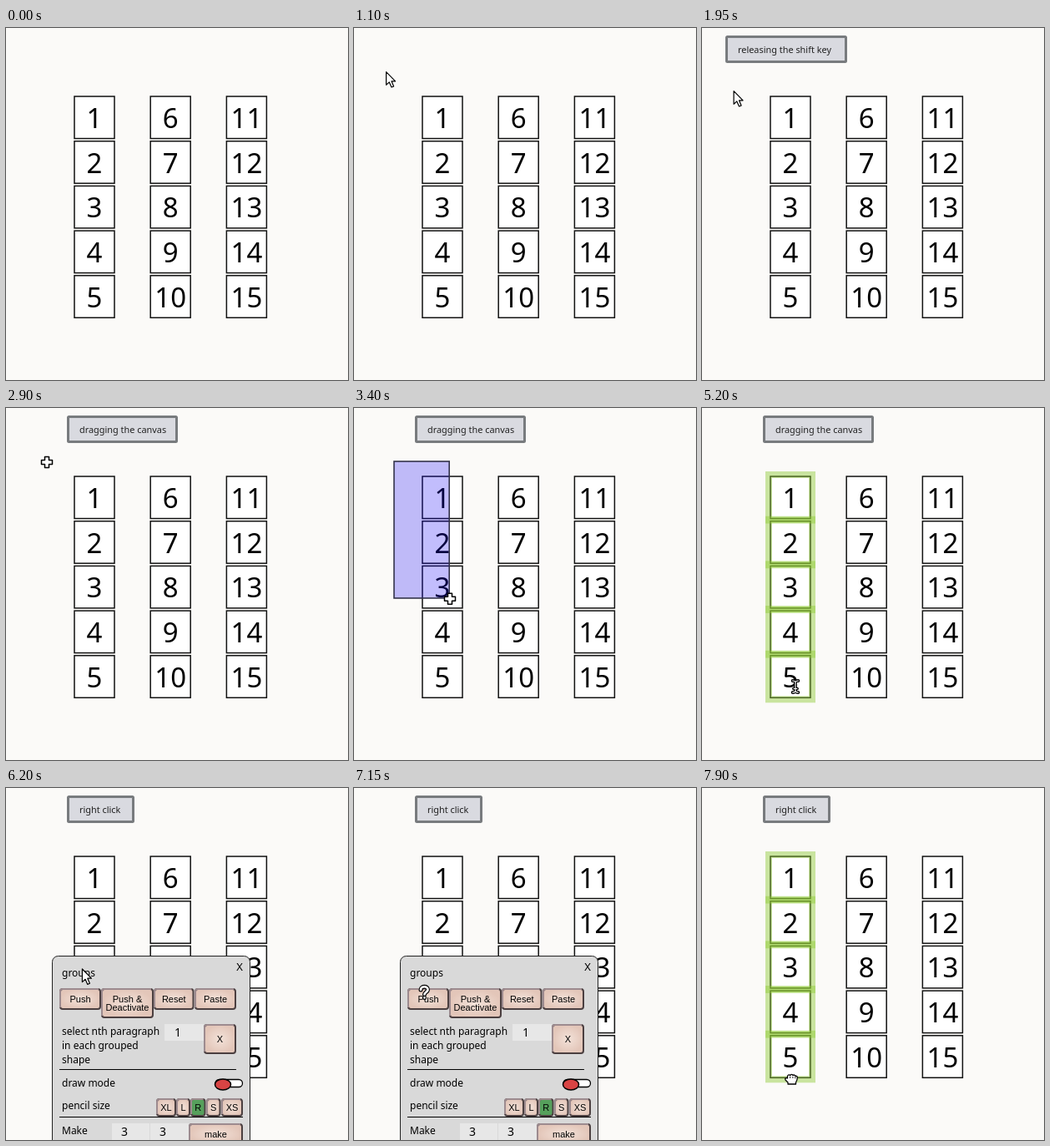
An HTML page for the animation above (8000 ms loop, 410x422 px).

```html
<!DOCTYPE html>
<html lang="en">
<head>
<meta charset="utf-8">
<title>Grouping shapes</title>
<style>
  html, body { margin: 0; width: 100%; height: 100%; overflow: hidden; background: #fbfaf8; }
  svg { display: block; width: 100%; height: 100%; font: 12px "Noto Sans", "Open Sans", sans-serif; }
  .box { fill: #fff; stroke: #111; stroke-width: 1.5; }
  .num { font-size: 33px; text-anchor: middle; }
  .glow { fill: none; stroke: #8cc832; stroke-opacity: .45; stroke-width: 8; }
  .btn { font: 11px "Liberation Sans", Arial, sans-serif; text-anchor: middle; }
  .field { fill: #e7e7e7; }
  .value { font-size: 14px; text-anchor: middle; }
  .line { stroke: #000; stroke-width: 1.2; }
  #lasso { fill: rgba(20, 0, 245, .26); stroke: #33334a; stroke-width: 1.6; }
  #label rect { fill: #d9dae0; stroke: #787b7e; stroke-width: 3; }
  #label text { font-size: 10.9px; fill: #222; }
  .cursor { fill: #fff; stroke: #000; stroke-linejoin: round; stroke-linecap: round; }
</style>
</head>
<body>
<svg id="stage" viewBox="0 0 410 422" preserveAspectRatio="xMinYMin meet">
  <defs>
    <radialGradient id="skin">
      <stop offset="0" stop-color="#f3e2d9"/>
      <stop offset="1" stop-color="#e3c6b9"/>
    </radialGradient>
  </defs>
  <g id="grid"></g>
  <g id="glow"></g>
  <rect id="lasso" x="48" y="64"/>
  <g id="label"><rect y="10.5" height="30" rx="1"/><text y="30"></text></g>
  <g id="panel"></g>
  <g id="pointer">
    <path class="cursor" data-kind="arrow" stroke-width="1.2"
      d="M.6 .6V16.2L4.3 12.9L7 19L9.6 17.9L7 11.8H11.6Z"/>
    <path class="cursor" data-kind="cross" stroke-width="1.5"
      d="M-2.5-6.5h5v4h4v5h-4v4h-5v-4h-4v-5h4z"/>
    <g class="cursor" data-kind="beam" style="fill:none">
      <path id="beam" d="M-3.5-7Q-.5-7 0-5.5Q.5-7 3.5-7M0-5.5V5.5M-3.5 7Q-.5 7 0 5.5Q.5 7 3.5 7M-2 2.5H2" stroke-width="3.4"/>
      <use href="#beam" style="stroke:#000"/>
      <path d="M-3.5-7Q-.5-7 0-5.5Q.5-7 3.5-7M0-5.5V5.5M-3.5 7Q-.5 7 0 5.5Q.5 7 3.5 7M-2 2.5H2" stroke="#fff" stroke-width="1.1"/>
    </g>
    <g class="cursor" data-kind="help" style="fill:none">
      <path d="M-4-3C-4-8 5-8 4.5-3C4.3-.5 .5 0 .5 2.5M.5 6.4V6.5" stroke-width="5"/>
      <path d="M-4-3C-4-8 5-8 4.5-3C4.3-.5 .5 0 .5 2.5M.5 6.4V6.5" stroke="#fff" stroke-width="2.7"/>
    </g>
    <g class="cursor" data-kind="hand" stroke-width="1.3">
      <path d="M-4 6V4L-7 1C-8-1-6-2-4.5-1V-3.5C-4-5.5-2-5.5-1.3-4.3C-.5-6 1.5-6 2-4.3C3-5.5 4.7-5 5-3.5C6.5-4.2 7.5-3 7.3-1.5C7.3 1 6.5 2.5 5.5 4V6Z"/>
      <path d="M-1.3-2.5V-1.5M1.9-2.5V-1.5M4.8-2.2V-1.2" stroke-width="1"/>
    </g>
  </g>
</svg>
<script>
const LOOP = 8000, TICK = 50;
const $ = id => document.getElementById(id);
const show = (el, on) => el.setAttribute('display', on ? 'inline' : 'none');

const rect = (cls, x, y, w, h, more = '') =>
  `<rect class="${cls}" x="${x}" y="${y}" width="${w}" height="${h}" ${more}/>`;
const text = (cls, x, y, s) => `<text class="${cls}" x="${x}" y="${y}">${s}</text>`;
const rule = (y, end) => `<path class="line" d="M64 ${y}H${end}"/>`;

// Bevelled button: dark frame, lighter top and left edges.
function button(x, y, w, h, lines, fill = 'url(#skin)') {
  const cx = x + w / 2, gap = 9.5;
  const base = y + h / 2 + 4 - (lines.length - 1) * gap / 2;
  return rect('', x + 1, y + 1, w - 2, h - 2, `rx="3" fill="${fill}" stroke="#4b3f40" stroke-width="2"`) +
    `<path d="M${x + 1} ${y + h - 3}V${y + 4}q0-3 3-3H${x + w - 3}" fill="none" stroke="#9d8b8f" stroke-width="2"/>` +
    lines.map((s, i) => text('btn', cx, base + i * gap, s)).join('');
}

function buildGrid() {
  let grid = '', glow = '';
  for (let i = 0; i < 15; i++) {
    const col = Math.floor(i / 5), x = 82 + col * 91.2, y = 82 + (i % 5) * 53.7;
    grid += rect('box', x, y, 48, 50.5) + text('num', x + 24, y + 38, i + 1);
    if (!col) glow += rect('glow', x - 2, y - 2, 52, 54.5);
  }
  $('grid').innerHTML = grid;
  $('glow').innerHTML = glow;
}

function buildPanel() {
  $('panel').innerHTML =
    rect('', 55.5, 201.5, 237, 240, 'rx="7" fill="#d9d9d9" stroke="#222"') +
    text('value', 280, 219, 'x').replace('x</text>', 'X</text>').replace('<text', '<text style="font-size:13px"') +
    text('', 67, 226, 'groups') +
    button(64, 240, 50, 26, ['Push']) +
    button(114, 240, 63, 36, ['Push &amp;', 'Deactivate']) +
    button(177, 240, 48.5, 26, ['Reset']) +
    button(226, 240, 50, 26, ['Paste']) +
    ['select nth paragraph', 'in each grouped', 'shape'].map((s, i) => text('', 67, 296 + i * 17, s)).join('') +
    rect('field', 190, 283, 47, 20) + text('value', 206, 298, 1) +
    button(237, 283, 39, 36, ['X']) +
    rule(337.5, 276) +
    text('', 67, 358, 'draw mode') +
    rect('', 251, 349.5, 32.5, 9, 'rx="4.5" fill="#fff" stroke="#000" stroke-width="1.3"') +
    '<ellipse cx="260" cy="355.5" rx="9.5" ry="6.5" fill="#d84444" stroke="#000" stroke-width="1.5"/>' +
    text('', 67, 385, 'pencil size') +
    button(180, 372, 24, 22, ['XL']) + button(204, 372, 17, 22, ['L']) +
    button(221, 372, 18.5, 22, ['R'], '#56a05c') +
    button(240, 372, 17.5, 22, ['S']) + button(258, 372, 26, 22, ['XS']) +
    rule(394.5, 284) +
    text('', 67, 415, 'Make') +
    rect('field', 127, 402, 45, 20) + text('value', 142, 417, 3) +
    rect('field', 173, 402, 46, 20) + text('value', 188, 417, 3) +
    button(219, 402, 65, 26, ['make']);
}

// Pointer path: time, x, y, shape (kept until changed).
const path = [
  [500, 66, 373, 'arrow'], [900, 41, 53], [1050, 41, 53], [1100, 38, 52],
  [1350, 29, 96], [1850, 38, 80], [1900, 38, 80], [2000, 37, 70], [2100, 37, 70],
  [2150, 40, 66], [2300, 50, 67, 'cross'], [2750, 49, 65], [2900, 49, 65],
  [3300, 98, 190], [3700, 166, 345], [3750, 166, 345], [3900, 166, 371], [4250, 166, 371],
  [4300, 163, 369, 'arrow'], [4600, 125, 342, 'beam'], [4800, 116, 338], [5150, 116, 338],
  [5200, 112, 334], [5250, 111, 336], [5350, 111, 336],
  [5400, 86, 290, 'hand'], [5500, 62, 230, 'arrow'], [5600, 54, 199], [6150, 54, 199],
  [6400, 238, 286], [6500, 200, 257, 'help'], [6750, 84, 245], [7200, 84, 245],
  [7250, 84, 243, 'hand'], [7350, 84, 243], [7450, 96, 270, 'beam'], [7700, 118, 334],
  [7800, 118, 334], [7850, 121, 345, 'hand'], [7900, 107, 349], [LOOP, 107, 349]
];

// Label: start time, x, width, words.
const labels = [
  [1500, 28, 135, 'holding the shift key'],
  [1950, 28, 146, 'releasing the shift key'],
  [2900, 73, 133, 'dragging the canvas'],
  [5750, 73, 81, 'right click']
];

function pointerAt(t) {
  let i = 0, kind = 'arrow';
  while (i < path.length - 2 && path[i + 1][0] <= t) { kind = path[i][3] || kind; i++; }
  kind = path[i][3] || kind;
  const [t0, x0, y0] = path[i], [t1, x1, y1] = path[i + 1];
  const k = Math.max(0, (t - t0) / (t1 - t0));
  return { x: x0 + (x1 - x0) * k, y: y0 + (y1 - y0) * k, kind };
}

function draw(t) {
  const p = pointerAt(t);
  show($('pointer'), t >= 500);
  $('pointer').setAttribute('transform', `translate(${p.x} ${p.y})`);
  for (const c of $('pointer').children) show(c, c.dataset.kind === p.kind);

  const lasso = t > 2900 && t < 4300;
  show($('lasso'), lasso);
  if (lasso) {
    $('lasso').setAttribute('width', Math.max(0, p.x - 48.8));
    $('lasso').setAttribute('height', Math.max(0, p.y - 64.8));
  }

  const open = t >= 5750 && t < 7250;
  show($('panel'), open);
  show($('glow'), t >= 4300 && !open && p.x > 76 && p.x < 136);

  const label = labels.filter(l => l[0] <= t).pop();
  show($('label'), label);
  if (label) {
    const [, x, w, words] = label, [frame, caption] = $('label').children;
    frame.setAttribute('x', x + 1.5);
    frame.setAttribute('width', w - 3);
    caption.setAttribute('x', x + 15);
    caption.textContent = words;
  }
}

buildGrid();
buildPanel();
const start = performance.now();
function tick(now) {
  const t = Math.max(0, now - start) % LOOP;
  draw(Math.floor(t / TICK) * TICK);
  requestAnimationFrame(tick);
}
draw(0);
requestAnimationFrame(tick);
</script>
</body>
</html>
```
